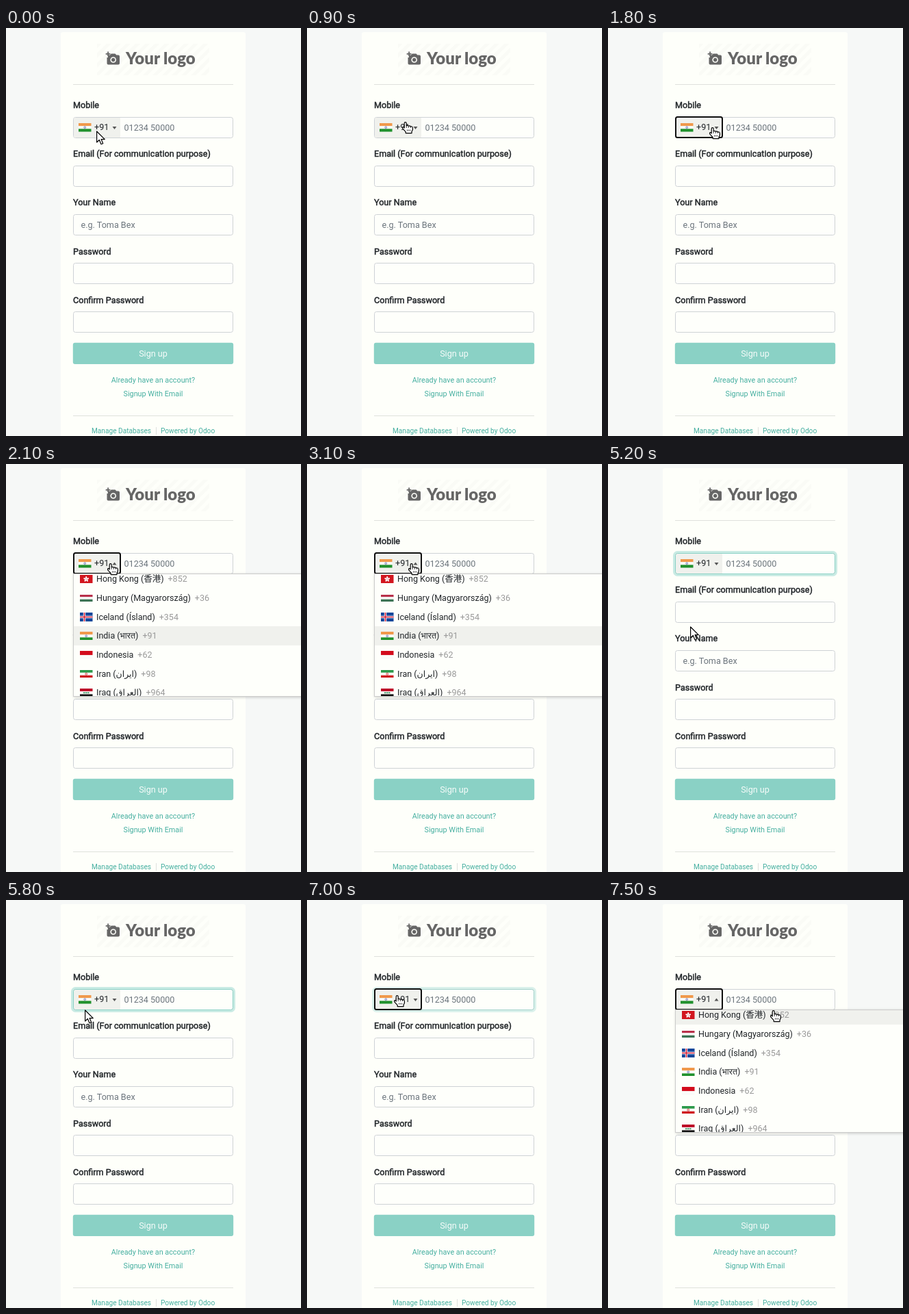
An HTML page that plays this animation: 431 by 596 pixels, repeating every 8 s.

```html
<!DOCTYPE html>
<html lang="en">
<head>
<meta charset="utf-8">
<title>Sign up form</title>
<style>
html, body { margin: 0; width: 100%; height: 100%; overflow: hidden; background: #f6f8f7; }
#stage { position: relative; width: 431px; height: 596px; overflow: hidden; font: 12.6px Roboto, "Noto Sans", "Noto Sans CJK SC", sans-serif; }
svg { display: block; }
#form, #cursor { position: absolute; left: 0; top: 0; }
.label { fill: #212529; stroke: #212529; stroke-width: .45px; }
.hint { fill: #6c757d; }
.link { fill: #45afa0; }
.mid { text-anchor: middle; }
.box { fill: #fefffb; stroke: #ced2d6; }
.rule { stroke: #dfe1dd; }
#list { position: absolute; left: 98px; top: 160px; width: 420px; height: 178px; overflow: hidden; font-size: 12.5px;
  background: #fefffb; border: 1px solid #ccc; box-shadow: 1px 1px 4px rgba(0,0,0,.2); }
#rows { position: absolute; top: -6.7px; left: 0; right: 0; }
.row { display: flex; align-items: center; height: 27.7px; line-height: 27.7px; padding-left: 9px; color: #212529; white-space: nowrap; }
.row.on { background: #f0f1ed; }
.row svg { flex: none; margin-right: 5.5px; }
.row i { font-style: normal; color: #999; margin-left: 6px; }
</style>
</head>
<body>
<div id="stage">
  <svg id="form" width="431" height="596" viewBox="0 0 431 596">
    <defs>
      <pattern id="stripes" width="10" height="10" patternUnits="userSpaceOnUse" patternTransform="rotate(45)">
        <path d="M0 0H5V10H0Z" fill="#fafbf6"/>
      </pattern>
    </defs>
    <rect x="80" y="6" width="270" height="600" rx="3" fill="#fefffa"/>

    <rect x="133" y="23" width="164" height="46" fill="url(#stripes)"/>
    <g fill="#666">
      <path d="M149 39.5H152L153.8 37.5H159.5L161.3 39.5H164Q166 39.5 166 41.5V51.5Q166 53.5 164 53.5H149.5Q147.5 53.5 147.5 51.5V43H149Z"/>
      <path d="M148.2 34.5H150V37H152.5V38.8H150V41.3H148.2V38.8H145.7V37H148.2Z"/>
      <circle cx="156.7" cy="46.5" r="4.3" fill="#fefffa"/>
      <circle cx="156.7" cy="46.5" r="2.7"/>
      <text x="175" y="53" font-family="Lato, sans-serif" font-weight="900" font-size="24">Your logo</text>
    </g>
    <path class="rule" d="M98 82.5H332M98 566.5H332M219.5 583V594"/>

    <g id="fields"></g>
    <rect id="glow" x="96.5" y="128.5" width="237" height="34" rx="5" fill="none" stroke="#c9ebe4" stroke-width="3"/>
    <path d="M167 131V160H101Q99 160 99 158V133Q99 131 101 131Z" fill="#f0f1ed"/>
    <rect id="edge" x="98.5" y="130.5" width="233" height="30" rx="3" fill="none" stroke="#8ad1c5"/>
    <g id="flag" transform="translate(106 139)"></g>
    <text x="129" y="149.300" fill="#212529">+91</text>
    <path id="caret" fill="#555"/>
    <text class="hint" x="172.500" y="150">01234 50000</text>
    <text class="hint" x="109.500" y="292">e.g. Toma Bex</text>
    <rect id="focus" x="99" y="130" width="68" height="30" rx="2.500" fill="none" stroke="#101010" stroke-width="2"/>

    <rect x="97.800" y="459.700" width="234.400" height="31.200" rx="3" fill="#8ad1c5"/>
    <text class="mid" x="215" y="479.500" fill="#f7fcfa">Sign up</text>
    <g class="link">
      <g class="mid" font-size="10.800">
        <text x="215" y="518">Already have an account?</text>
        <text x="215" y="538">Signup With Email</text>
      </g>
      <g font-size="10.150">
        <text x="125" y="592">Manage Databases</text>
        <text x="226" y="592">Powered by Odoo</text>
      </g>
    </g>
  </svg>

  <div id="list"><div id="rows"></div></div>

  <svg id="cursor" width="24" height="24" viewBox="0 0 24 24" fill="#fff" stroke="#000" stroke-width="1.200" stroke-linejoin="round">
    <path id="arrow" d="M.6 1V17L4.300 13.500L7 19.800L9.700 18.700L7.100 12.600H12.300Z"/>
    <g id="hand">
      <path d="M3.200 9V2.200Q3.200 .7 4.700 .7T6.200 2.200V5.700Q8 4.800 9.300 6.200Q11.200 5.400 12.300 6.900Q15.400 6.300 15.400 9V11.500L14 14.300V16.600H5.200V14.600L.8 9.900Q.1 8.200 1.300 7.600Q2.300 7.300 3.200 9Z"/>
      <path d="M6.200 5.800V9M9.300 6.400V9M12.300 7V9M7.500 11.500V13.500M9.600 11.500V13.500M11.700 11.500V13.500" fill="none" stroke-width=".8"/>
    </g>
  </svg>
</div>
<script>
const LOOP = 8000, STEP = 100;
const $ = id => document.getElementById(id);

// Flags on an 18.5 wide field
const flag = (h, colors, mark = "") => ({ h, art: colors.map((c, i) =>
  `<rect y="${i * h / colors.length}" width="18.5" height="${h / colors.length}" fill="${c}"/>`).join("") + mark });
const cross = (w, color) =>
  `<path d="M0 6.5H18.5M6.5 0V13" stroke="${color}" stroke-width="${w}"/>`;
const petal = (_, i) =>
  `<ellipse cx="9.2" cy="4" rx="1.1" ry="1.9" fill="#fff" transform="rotate(${i * 72} 9.2 6.2)"/>`;

const india = flag(12.5, ["#f0994c", "#fafaf8", "#20912d"],
  '<circle cx="9.2" cy="6.2" r="1.5" fill="#c5c8e2" stroke="#6d75b5" stroke-width=".6"/>');
const countries = [
  ["Hong Kong (香港)", "+852", flag(12.5, ["#d2161f"], Array.from({ length: 5 }, petal).join(""))],
  ["Hungary (Magyarország)", "+36", flag(10, ["#b8304a", "#f7f7f5", "#3c7354"])],
  ["Iceland (Ísland)", "+354", flag(13, ["#14479a"], cross(3.4, "#fff") + cross(1.6, "#d0203a"))],
  ["India (भारत)", "+91", india],
  ["Indonesia", "+62", flag(12.5, ["#d30c1c", "#fbfbf9"])],
  ["Iran (ایران&lrm;)", "+98", flag(11.5, ["#2c9a4a", "#fafaf8", "#cf1a20"],
    '<circle cx="9.2" cy="5.7" r="1.4" fill="none" stroke="#cf1a20" stroke-width=".8"/>')],
  ["Iraq (العراق&lrm;)", "+964", flag(12.5, ["#bd1029", "#fafaf8", "#111"],
    '<path d="M5 6.3H13.5" stroke="#1b8046" stroke-width="1.4" stroke-dasharray="2.4 .7"/>')]
];
$("rows").innerHTML = countries.map(([name, dial, { h, art }]) =>
  `<div class="row"><svg width="18.5" height="${h}">${art}</svg><span>${name}</span><i>${dial}</i></div>`).join("");
$("flag").innerHTML = india.art;

const labels = ["Mobile", "Email (For communication purpose)", "Your Name", "Password", "Confirm Password"];
$("fields").innerHTML = labels.map((text, i) =>
  `<text class="label" x="98" y="${117 + 71.2 * i}">${text}</text>` +
  `<rect class="box" x="98.5" y="${130.5 + 71 * i}" width="233" height="30" rx="3"/>`).join("");

// Each glide runs from the place before to x, y; bend pulls its middle sideways
const glides = [
  { from: 0, to: 0, x: 132, y: 150, shape: "arrow" },
  { from: 300, to: 500, x: 134, y: 133, shape: "hand" },
  { from: 700, to: 1300, x: 148, y: 145, shape: "hand" },
  { from: 3900, to: 4500, x: 121, y: 250, bend: -76, shape: "hand" },
  { from: 5100, to: 5900, x: 114, y: 147.5, shape: "arrow" },
  { from: 5900, to: 6800, x: 127, y: 139, bend: -30, shape: "hand" },
  { from: 7100, to: 7500, x: 237, y: 161, shape: "hand" }
];

const clamp = v => Math.min(1, Math.max(0, v));
const show = (id, on) => { $(id).style.display = on ? "" : "none"; };

function pointer(t) {
  const i = Math.max(0, glides.findLastIndex(g => g.from < t));
  const g = glides[i], a = glides[Math.max(0, i - 1)];
  const p = i ? clamp((t - g.from) / (g.to - g.from)) : 1;
  return {
    x: a.x + (g.x - a.x) * p + 2 * p * (1 - p) * (g.bend || 0),
    y: a.y + (g.y - a.y) * p,
    shape: g.shape
  };
}

function draw(time) {
  const t = Math.floor(time / STEP) * STEP;
  const { x, y, shape } = pointer(t);
  $("cursor").style.transform = `translate(${Math.round(x)}px, ${Math.round(y)}px)`;
  show("arrow", shape === "arrow");
  show("hand", shape === "hand");

  const open = t >= 2100 && t < 5100 || t >= 7300;
  show("list", open);
  show("focus", t >= 1800 && t < 5100 || t >= 7000);
  $("caret").setAttribute("d", open ? "M155.5 147.5H161.5L158.5 143.5Z" : "M155.5 144H161.5L158.5 148Z");
  $("glow").style.opacity = $("edge").style.opacity = clamp((t - 5000) / 200) * clamp((7100 - t) / 150);

  // India stays lit unless another row is under the pointer
  const over = x > 92 && y > 159;
  const lit = over ? Math.floor((y + 1 - 154.3) / 27.7) : 3;
  [...$("rows").children].forEach((row, i) => row.classList.toggle("on", i === lit));
}

const start = performance.now();
function tick() {
  draw((performance.now() - start) % LOOP);
  requestAnimationFrame(tick);
}
tick();
</script>
</body>
</html>
```
